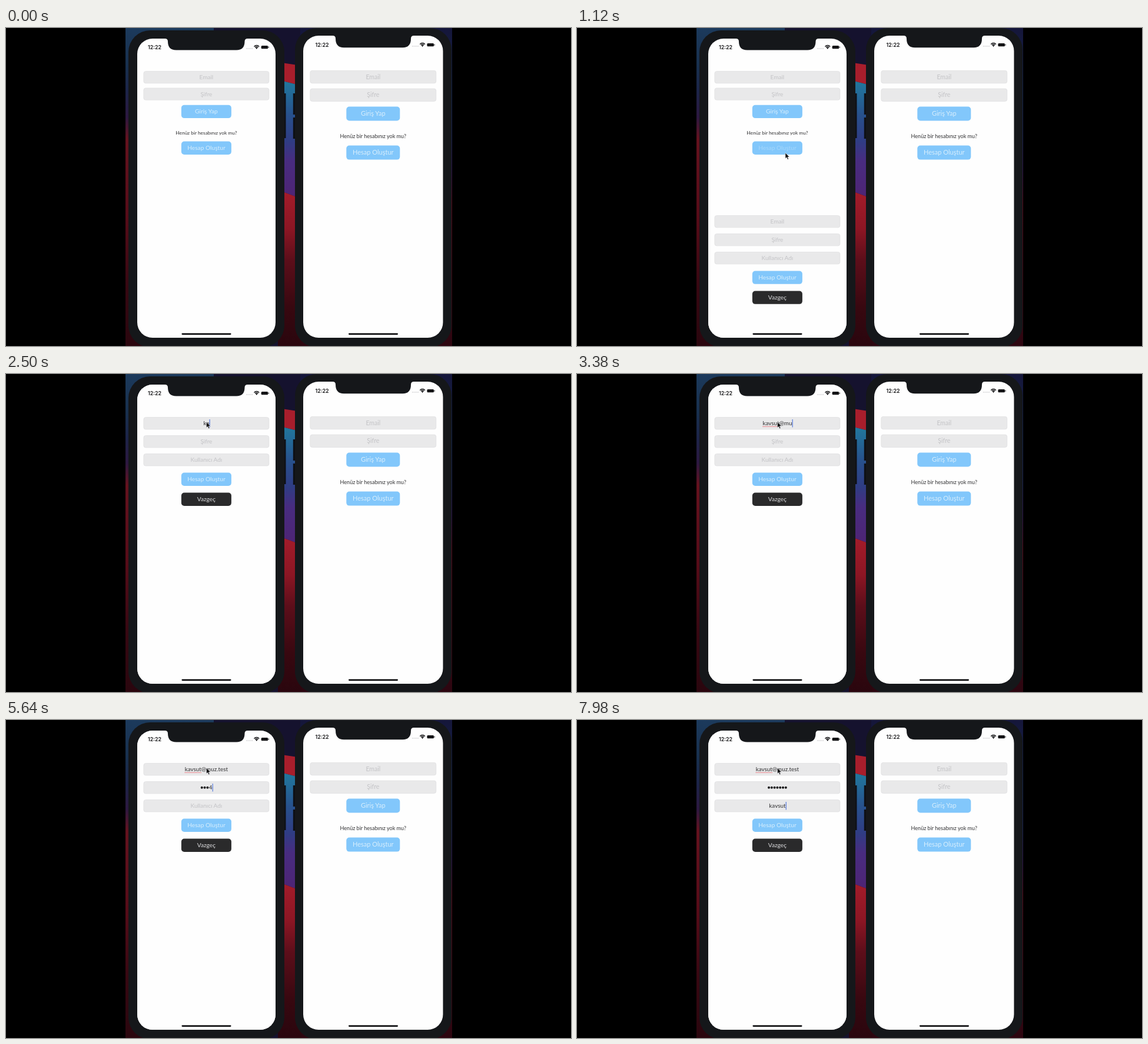
An HTML page for the animation above (8 s loop, 960 by 540 pixels).

```html
<!DOCTYPE html>
<html lang="tr">
<head>
<meta charset="utf-8">
<style>
html, body { margin: 0; width: 100%; height: 100%; overflow: hidden; background: #000; }
svg { display: block; width: 100vw; height: 100vh; }
text { font-family: Lato, "Open Sans", sans-serif; text-anchor: middle; }
.clock { font: 600 8.9px Inter, Roboto, sans-serif; fill: #141416; }
.field { fill: #e9e9ea; stroke: #dadadc; stroke-width: .6; }
.hint { fill: #c3c3c6; }
.typed { fill: #303032; font-size: 9.9px; }
.start { text-anchor: start; }
.body { fill: #15171a; }
.key { fill: #0e1016; }
.ink { fill: #141416; }
.paper { fill: #fefefe; }
</style>
</head>
<body>
<svg id="stage" viewBox="0 0 960 540"></svg>
<script>
const LOOP = 8000;
const MAIL = "kavsut@muz.test", USER = "kavsut", PASS = "1234567";
const stage = document.getElementById("stage");

function add(parent, tag, attrs, text) {
  const node = document.createElementNS("http://www.w3.org/2000/svg", tag);
  for (const key in attrs) node.setAttribute(key, attrs[key]);
  if (text) node.textContent = text;
  parent.appendChild(node);
  return node;
}
const set = (node, key, value) => node.setAttribute(key, value);
const show = (node, on) => set(node, "visibility", on ? "visible" : "hidden");
const rect = (parent, x, y, width, height, attrs) =>
  add(parent, "rect", { x, y, width, height, ...attrs });
const clamp = v => Math.min(1, Math.max(0, v));
const smooth = v => v * v * (3 - 2 * v);

const defs = add(stage, "defs", {});

function gradient(id, stops) {
  const g = add(defs, "linearGradient", { id, x1: 0, y1: 0, x2: 0, y2: 1 });
  for (const [offset, color] of stops) add(g, "stop", { offset, "stop-color": color });
  return `url(#${id})`;
}

function wallpaper() {
  const left = gradient("left", [[0, "#1c3a5c"], [.12, "#18304e"], [.2, "#1c2448"], [.28, "#2c1840"],
    [.35, "#64121e"], [.6, "#560c18"], [.8, "#380812"], [1, "#2a060e"]]);
  const right = gradient("right", [[0, "#15163a"], [.2, "#16264c"], [.35, "#1c2450"], [.45, "#2e164a"],
    [.55, "#560c1c"], [1, "#2c0610"]]);
  const blue = gradient("blue", [[0, "#22789c"], [.12, "#236a98"], [.3, "#28508c"], [.52, "#303c84"],
    [.68, "#482c80"], [1, "#4e2474"]]);
  const red = gradient("red", [[0, "#a41c2a"], [.25, "#8c1624"], [.45, "#5c0e1a"], [.75, "#380810"], [1, "#2a060e"]]);
  rect(stage, 203, 0, 150, 540, { fill: left });
  rect(stage, 353, 0, 147, 540, { fill: "#15122e" });
  rect(stage, 500, 0, 258, 540, { fill: right });
  add(stage, "path", { d: "M462 58L502 64V98L462 88Z", fill: "#a81e2c" });
  add(stage, "path", { d: "M462 88L502 98V290L462 275Z", fill: blue });
  add(stage, "path", { d: "M462 275L502 290V540H462Z", fill: red });
}

// Side keys that stick out into the gap between the devices.
function sideKeys() {
  rect(stage, 472, 111, 3.5, 76, { class: "key" });
  for (const y of [111, 152]) rect(stage, 487.8, y, 4, 36, { class: "key" });
}

function statusBar(parent, clockX, wifiX, y) {
  add(parent, "text", { x: clockX, y: y + 3.3, class: "clock" }, "12:22");
  for (let i = 0; i < 5; i++)
    add(parent, "circle", { cx: wifiX - 17 + i * 2.4, cy: y + 2.4, r: .65, fill: "#b0b0b4" });
  for (const r of [5.4, 3.4])
    add(parent, "path", {
      d: `M${wifiX - r * .8} ${y + 3 - r * .72}A${r} ${r} 0 0 1 ${wifiX + r * .8} ${y + 3 - r * .72}`,
      fill: "none", stroke: "#141416", "stroke-width": 1.4
    });
  add(parent, "path", { d: `M${wifiX} ${y + 3.4}l-1.9-2.3q1.9-1.3 3.8 0z`, class: "ink" });
  rect(parent, wifiX + 7.8, y - 2.6, 11.6, 5.4, { rx: 1.5, class: "ink" });
  rect(parent, wifiX + 20, y - 1, 1, 2.2, { class: "ink" });
}

// Draws one device and returns the layer that holds its app screens.
function phone(id, o) {
  rect(stage, o.bx, o.by, o.bw, 542 - o.by, { rx: 37, class: "body" });
  const screen = { x: o.x, y: o.y, width: o.w, height: 526 - o.y, rx: 26 };
  add(add(defs, "clipPath", { id }), "rect", screen);
  add(stage, "rect", { ...screen, class: "paper" });
  const layer = add(stage, "g", { "clip-path": `url(#${id})` });
  const [l, r, t, b] = [o.nl, o.nr, o.y, o.nb];
  add(stage, "path", {
    d: `M${l - 5} ${t - 1}V${t}Q${l} ${t} ${l} ${t + 5}Q${l} ${b} ${l + 14} ${b}H${r - 14}` +
       `Q${r} ${b} ${r} ${t + 5}Q${r} ${t} ${r + 5} ${t}V${t - 1}Z`,
    class: "body"
  });
  statusBar(stage, o.clockX, o.wifiX, o.barY);
  rect(stage, o.cx - 42, 518.2, 84, 2.7, { rx: 1.3, class: "ink" });
  return layer;
}

function label(parent, x, y, size, text, attrs) {
  return add(parent, "text", { x, y: y + size * .35, "font-size": size, ...attrs }, text);
}

function field(parent, cx, y, w, h, size, hint) {
  rect(parent, cx - w / 2, y, w, h, { rx: 3.5, class: "field" });
  return label(parent, cx, y + h / 2, size, hint, { class: "hint" });
}

function button(parent, cx, y, w, h, size, text, fill = "#82c7fb", ink = "#d8eefc") {
  rect(parent, cx - w / 2, y, w, h, { rx: 5, fill });
  return label(parent, cx, y + h / 2, size, text, { fill: ink });
}

function login(parent, cx, o) {
  field(parent, cx, o.mail, o.fw, o.fh, o.hint, "Email");
  field(parent, cx, o.pass, o.fw, o.fh, o.hint, "Şifre");
  button(parent, cx, o.enter, o.bw, o.bh, o.font, "Giriş Yap");
  label(parent, cx, o.ask, o.small, "Henüz bir hesabınız yok mu?", { fill: "#303032" });
  return button(parent, cx, o.join, o.bw, o.bh, o.font, "Hesap Oluştur");
}

wallpaper();
sideKeys();
const leftApp = phone("screenL", { bx: 208, by: 4, bw: 265, x: 223, y: 18, w: 235,
  nl: 275, nr: 405.5, nb: 37.5, clockX: 252.5, wifiX: 425.8, barY: 32.5, cx: 340.5 });
const rightApp = phone("screenR", { bx: 491, by: 0, bw: 266, x: 505, y: 13, w: 237.5,
  nl: 560, nr: 688, nb: 33.3, clockX: 537, wifiX: 707.6, barY: 28.5, cx: 624 });

const CX = 340.4;
const joinText = login(leftApp, CX, { mail: 73.5, pass: 102, fw: 213, fh: 20.3, hint: 10, enter: 130.7,
  bw: 85, bh: 22.4, font: 10.2, ask: 178.2, small: 8.4, join: 192.6 });
login(rightApp, 623.8, { mail: 72.3, pass: 103, fw: 214, fh: 21.5, hint: 10.5, enter: 133.5,
  bw: 91, bh: 24, font: 11, ask: 184.2, small: 9.04, join: 199.6 });

const sheet = add(leftApp, "g", {});
rect(sheet, 222, 18, 238, 510, { class: "paper" });
const hints = ["Email", "Şifre", "Kullanıcı Adı"].map((text, i) =>
  field(sheet, CX, 73.6 + i * 31, 213, 20.4, 10, text));
button(sheet, CX, 167.6, 85, 22.4, 10.2, "Hesap Oluştur");
button(sheet, CX, 201.6, 85, 22.4, 10.2, "Vazgeç", "#2a2a2b", "#dcdcde");

const mailText = add(sheet, "text", { x: CX, y: 87.2, class: "typed" });
const squiggle = add(sheet, "line", { y1: 89.2, y2: 89.2, stroke: "#e8505a",
  "stroke-width": 1.1, "stroke-dasharray": "1.4 .7" });
const dots = [...PASS].map(() => add(sheet, "circle", { cy: 114.7, r: 2, class: "ink" }));
const digit = add(sheet, "text", { y: 118.2, class: "typed start" });
const userText = add(sheet, "text", { x: CX, y: 149.4, class: "typed" });
const caret = rect(sheet, 0, 0, 1.1, 13.5, { fill: "#4a70dc" });

const cursor = add(stage, "path", {
  d: "M0 0V9.6L2.2 7.6L3.8 11.2L5.4 10.5L3.9 7H6.9Z",
  fill: "#0c0c0e", stroke: "#e6e6ea", "stroke-width": .6
});

// Focus time, delay base, ms per key and value of each field.
const inputs = [
  { focus: 1900, from: 2230, step: 125, value: MAIL },
  { focus: 4620, from: 4800, step: 200, value: PASS },
  { focus: 6600, from: 6900, step: 150, value: USER }
];
const typedCount = (f, t) => Math.max(0, Math.min(f.value.length, Math.floor((t - f.from) / f.step)));

// Pointer stops: time, x, y.
const stops = [[420, 392, 545], [880, 354, 212], [1140, 354, 212], [1400, 336, 127], [1750, 340.5, 81.5]];
function pointer(t) {
  let [, x, y] = stops[0];
  for (let i = 1; i < stops.length; i++) {
    const [t0, x0, y0] = stops[i - 1], [t1, x1, y1] = stops[i];
    if (t < t0) break;
    const k = smooth(clamp((t - t0) / (t1 - t0)));
    x = x0 + (x1 - x0) * k;
    y = y0 + (y1 - y0) * k;
  }
  return [x, y];
}

function drawPassword(count, t) {
  const lastKey = inputs[1].from + count * inputs[1].step;
  const open = count > 0 && t < inputs[2].focus && t - lastKey < 1000;
  const shown = open ? count - 1 : count;
  const width = shown * 4.8 + (open ? 5.7 : 0);
  const x = CX - width / 2;
  dots.forEach((dot, i) => {
    show(dot, i < shown);
    set(dot, "cx", x + 2.4 + i * 4.8);
  });
  digit.textContent = open ? PASS[count - 1] : "";
  set(digit, "x", x + shown * 4.8);
  return width;
}

function draw(t) {
  // Critically damped spring carries the sheet up.
  const s = Math.max(0, t - 1045.5) * .023;
  set(sheet, "transform", `translate(0 ${(508 * (1 + s) * Math.exp(-s)).toFixed(2)})`);
  show(sheet, s > 0);

  const press = clamp((t - 900) / 60) * (1 - clamp((t - 1160) / 200));
  set(joinText, "opacity", 1 - .6 * press);

  const counts = inputs.map(f => typedCount(f, t));
  hints.forEach((hint, i) => set(hint, "opacity", counts[i] ? 0 : 1));
  mailText.textContent = MAIL.slice(0, counts[0]);
  userText.textContent = USER.slice(0, counts[2]);
  const mailWidth = counts[0] ? mailText.getComputedTextLength() : 0;
  const userWidth = counts[2] ? userText.getComputedTextLength() : 0;
  const widths = [mailWidth, drawPassword(counts[1], t), userWidth];

  const marked = counts[0] > USER.length;
  show(squiggle, marked);
  if (marked) {
    const x = CX - mailWidth / 2;
    set(squiggle, "x1", x);
    set(squiggle, "x2", x + mailText.getSubStringLength(0, USER.length));
  }

  const active = inputs.filter(f => t >= f.focus).length - 1;
  let on = active >= 0;
  if (on) {
    const f = inputs[active], n = counts[active];
    const since = t - (n ? f.from + n * f.step : f.focus);
    on = since % 1000 < 500;
    set(caret, "x", CX + widths[active] / 2 + .2);
    set(caret, "y", 77 + active * 31);
  }
  show(caret, on);

  const [x, y] = pointer(t);
  set(cursor, "transform", `translate(${x.toFixed(2)} ${y.toFixed(2)})`);
}

function tick() {
  draw(performance.now() % LOOP);
  requestAnimationFrame(tick);
}
tick();
</script>
</body>
</html>
```
